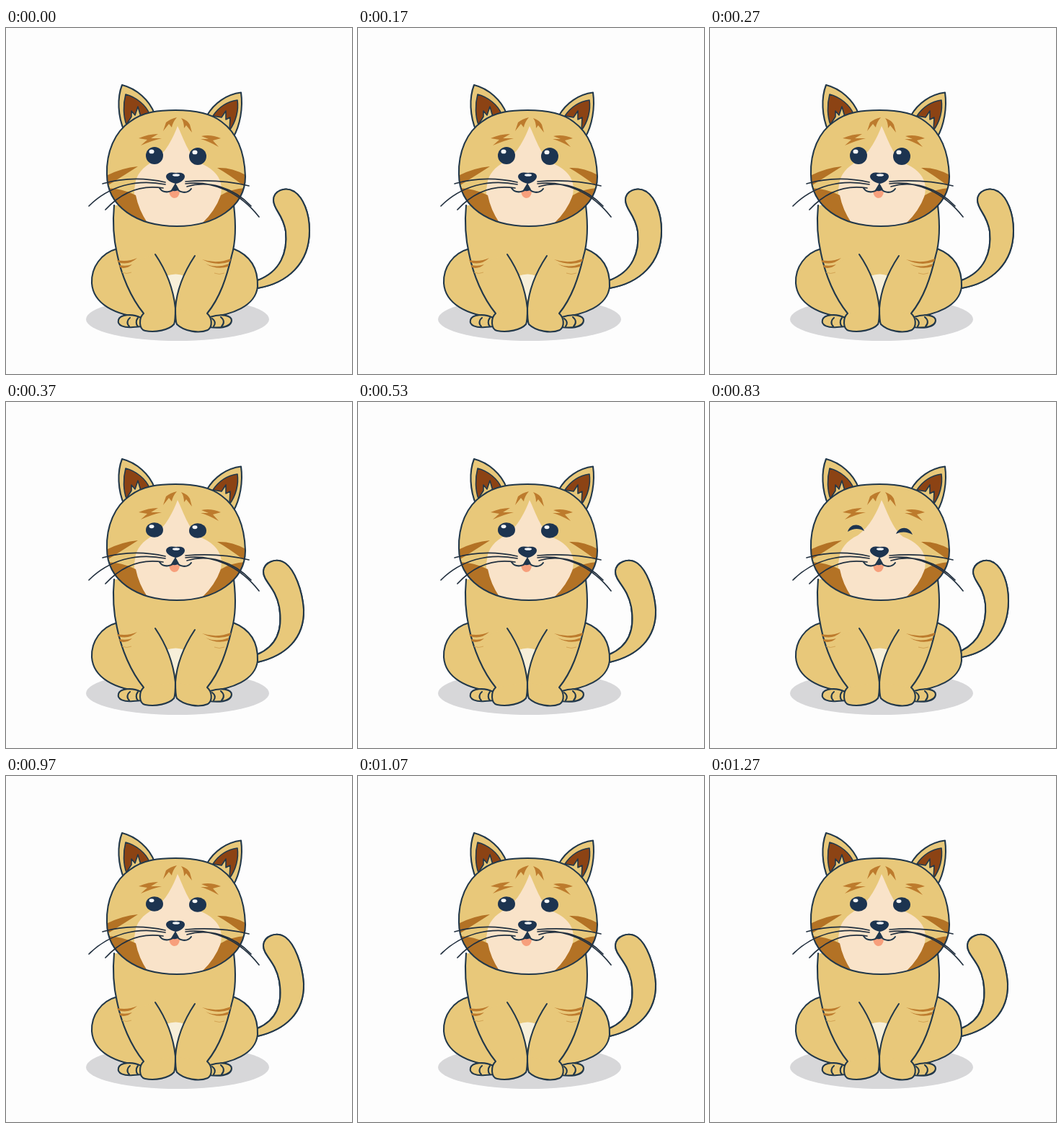
Write an HTML page that moves like this. It is 480 px wide and 480 px high and loops after 1.31 s.

```html
<!DOCTYPE html>
<html lang="en">
<head>
<meta charset="utf-8">
<title>Blinking cat</title>
<style>
  html, body { margin: 0; width: 100%; height: 100%; overflow: hidden; background: #fdfdfd; }
  svg { display: block; width: 100%; height: 100%; }
  .line { fill: none; stroke: #22384a; stroke-width: 2.1; stroke-linecap: round; stroke-linejoin: round; }
  .fur, .fur.line { fill: #e8c87a; }
  .cream { fill: #f9e3c9; }
  .mark { fill: #bd7b2d; }
  .dark { fill: #b37225; }
  .ear.line { fill: #8c4314; stroke-width: 1.6; }
  .ink { fill: #1d3450; }
  .whisker { fill: none; stroke: #22303f; stroke-width: 1.7; stroke-linecap: round; }
</style>
</head>
<body>
<svg viewBox="0 0 480 480">
  <defs>
    <path id="skull" d="M140 203C139 172 151 144 172 130C190 116 213 114 235 114C263 114 284 118 299 130C321 146 331 174 332 206C332 248 290 275 237 275C182 275 140 248 140 203Z"/>
    <clipPath id="inHead"><use href="#skull"/></clipPath>
    <clipPath id="inTail"><use href="#tailShape"/></clipPath>
  </defs>

  <ellipse cx="238" cy="404" rx="127" ry="30" fill="#d7d7d9"/>

  <g id="tail">
    <path id="tailShape" class="fur line"/>
    <g id="bands" class="mark" clip-path="url(#inTail)"></g>
    <use href="#tailShape" style="fill: none"/>
  </g>

  <g id="body">
    <path class="fur line" d="M155 306C132 312 118 332 119 354C121 382 150 399 194 402L278 402C314 398 346 386 349 359C350 333 338 315 315 306Z"/>
    <path class="fur line" d="M187 402C176 396 158 397 156 405C154 413 164 416 176 415L190 414M283 401C298 396 313 398 313 406C312 414 300 417 281 415"/>
    <path class="line" d="M172 402C168 405 167 410 171 414M183 402C180 406 180 411 183 414M286 403C290 406 291 410 288 414M298 401C303 405 303 410 299 414"/>
    <path class="fur" d="M150 246C147 278 151 300 154 313C160 343 173 374 191 396L279 396C297 374 306 346 313 316C319 296 319 271 316 246Z"/>
    <path d="M222 344Q236 339 248 344L235 378Z" fill="#f7efd9"/>
    <path class="fur" d="M207 314C222 336 232 360 235 389L235 402L191 402L160 330ZM262 316C248 337 237 360 235 389L235 402L280 400L312 330Z"/>
    <path class="fur" d="M191 396C184 402 184 418 193 420C207 423 226 419 233 411Q235 407 235 389ZM279 396C286 402 287 414 280 419C268 424 247 421 237 411Q235 407 235 389Z"/>
    <path class="line" d="M150 246C147 278 151 300 154 313C160 343 173 374 191 396C184 402 184 418 193 420C207 423 226 419 233 411Q235 407 235 389C232 360 222 336 207 314"/>
    <path class="line" d="M316 246C319 271 319 296 313 316C306 346 297 374 279 396C286 402 287 414 280 419C268 424 247 421 237 411Q235 407 235 389C237 360 248 337 262 316"/>
    <path class="mark" d="M154 322Q169 325 182 319Q170 330 156 325ZM157 329Q167 331 175 328Q167 335 158 332ZM272 321Q292 328 312 320L311 324Q292 331 272 321ZM277 327Q292 334 309 327L308 331Q292 336 277 327Z"/>
    <path d="M161 339Q167 342 174 339M289 340Q296 343 303 340" fill="none" stroke="#d4a555"/>
  </g>

  <g id="head">
    <path class="fur line" d="M164 143C155 122 154 97 161 79C181 84 199 100 206 119ZM279 121C289 104 306 92 326 89.500C329 110 325 135 315 152Z"/>
    <path class="ear line" d="M166 92C162 107 163 123 167 134L174 123L174 115L179 121L183 109L187 123L199 119C194 107 181 96 166 92ZM321 100C307 102 295 110 287 122L299 124L305 115L305 127L311 124L310 142C319 130 323 114 321 100Z"/>
    <use href="#skull" class="fur"/>
    <g clip-path="url(#inHead)">
      <path class="cream" d="M238 136C232 152 222 173 205 185C190 192 180 204 179 218C175 237 183 256 197 280L270 280C286 261 298 245 299 222C298 204 284 193 268 187C253 176 246 152 238 136Z"/>
      <path class="dark" d="M137 206Q160 194 183 192Q166 203 137 221ZM136 222Q160 222 180 232Q184 252 196 270L196 282L130 270ZM334 205Q314 193 293 194Q309 203 334 222ZM336 222Q315 222 298 232Q290 254 272 271L272 284L340 270Z"/>
    </g>
    <path class="mark" d="M218 143L222 131Q228 126 237 124Q231 131 230 138L226 133ZM243 125Q252 128 255 134L258 145L250 135L247 139Q247 130 243 125ZM184 153Q197 147 211 147L201 153L216 153Q203 156 187 163L196 155ZM298 153Q284 147 271 150L281 154L270 154Q281 157 295 165L287 156Z"/>
    <use href="#skull" class="line"/>

    <g id="openEyes"></g>
    <path id="shutEyes" class="ink" d="M191 180C194 168 210 167 214 179C207 175 199 175 191 180ZM258 183C263 172 276 172 281 184C274 180 266 179 258 183Z"/>

    <path d="M226 226Q234 224 241 227Q240 236 233 236Q227 235 226 226Z" fill="#f79f7c"/>
    <path class="ink" d="M222 206C223 200 230 200 236 201C242 200 248 201 248 206C248 211 241 215 236 216C230 215 222 211 222 206ZM235 215L240 224Q235 228 229 225Z"/>
    <ellipse cx="236" cy="204" rx="5" ry="1.8" fill="#f2f4f6"/>
    <path class="line" d="M213 222C218 230 232 229 235 219C239 230 252 230 257 223"/>
    <path class="whisker" d="M221 214Q176 204 134 216M221 217C181 209 143 219 115 247M218 222C187 217 160 228 138 252M249 213Q296 209 337 219M249 216C288 211 325 229 351 262M251 220C281 211 315 221 340 247"/>
  </g>
</svg>

<script>
const LOOP = 1310;
const byId = id => document.getElementById(id);

// Band entries: x, y, tilt in degrees.
const OPEN = {
  lid: 12, eyeY: 177,
  tail: "M349 361C390 354 421 327 421 281C421 256 412 235 400 227C387 219 371 226 371 239C372 254 384 257 388 282C391 311 381 338 349 350",
  bands: [[397, 254, -3], [403, 276, 0], [404, 296, 2]]
};
const HALF = {
  lid: 10.3, eyeY: 177.5,
  tail: "M349 361C388 352 414 328 413 288C411 260 400 233 388 224C375 215 358 222 357 235C357 249 374 257 379 284C384 313 377 338 349 350",
  bands: [[384, 250, -7], [394, 273, -5], [397, 291, -2]]
};
const SHUT = {
  lid: 0, eyeY: 177,
  tail: "M349 354C388 347 414 320 414 276C414 251 406 231 394 223C381 215 365 224 365 236C366 250 379 254 382 280C384 307 375 332 349 345",
  bands: [[391, 250, -3], [397, 273, 0], [398, 293, 2]]
};

// Each pose holds for a third of a second; the first is cut a little short.
const CYCLE = [OPEN, HALF, SHUT, HALF];
const HOLD = 1000 / 3;
const LEAD = 34;
const poseAt = t => CYCLE[Math.floor((t + LEAD) / HOLD) % CYCLE.length];

const zigzag = "M-18 1L-9 -6L-5 -1L3 -7L7 -3L18 -10L11 3L6 1L1 8L-5 4L-9 10L-13 5L-18 9Z";

function eyes({ lid, eyeY }) {
  return [206, 266].map((x, i) => {
    const y = eyeY + i;
    return `<ellipse class="ink" cx="${x}" cy="${y}" rx="12" ry="${lid}"/>` +
      `<ellipse cx="${x - 4}" cy="${y - lid * 0.46}" rx="3.5" ry="${lid * 0.24}" fill="#f6f7f8"/>`;
  }).join("");
}

let shown;
function draw(t) {
  const pose = poseAt(t);
  if (pose === shown) return;
  shown = pose;
  byId("tailShape").setAttribute("d", pose.tail);
  byId("bands").innerHTML = pose.bands.map(([x, y, a]) =>
    `<path d="${zigzag}" transform="translate(${x} ${y}) rotate(${a})"/>`).join("");
  byId("openEyes").innerHTML = pose.lid ? eyes(pose) : "";
  byId("shutEyes").style.display = pose.lid ? "none" : "";
}

const start = performance.now();
function tick() {
  draw((performance.now() - start) % LOOP);
  requestAnimationFrame(tick);
}
tick();
</script>
</body>
</html>
```
